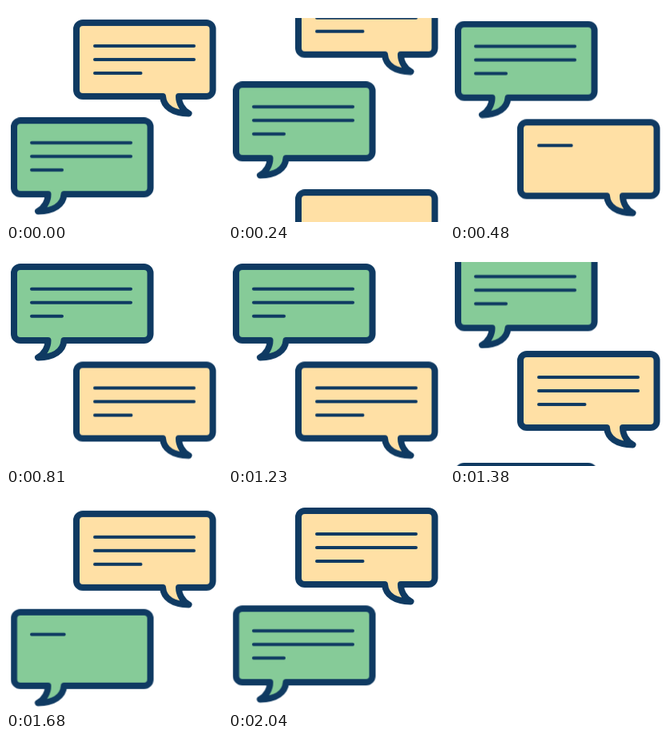
Write an HTML page without scripts that moves like this. It is 270 by 270 pixels and loops after 2.43 s.

```html
<!DOCTYPE html>
<html lang="en">
<head>
<meta charset="utf-8">
<title>Chat bubbles</title>
<style>
  html, body { margin: 0; width: 100%; height: 100%; overflow: hidden; background: #fff; }
  svg { display: block; width: 100%; height: 100%; }

  .ink { stroke: #0f3a62; stroke-linecap: round; stroke-linejoin: round; }
  .box { stroke-width: 8; }
  .line { stroke-width: 4; fill: none; }
  .yellow { fill: #ffe0a5; }
  .green { fill: #86cb98; }

  /* Each bubble rests at --a, --b and --c, with a cubic in-out slide between */
  .bubble { animation: slide 2430ms -30ms infinite; }
  .y-out { --a: 0px; --b: -142px; --c: -142px; }
  .y-in { --a: 264.5px; --b: 122.5px; --c: 0px; }
  .g-out { --a: 122.3px; --b: 0px; --c: -142px; }
  .g-in { --a: 264.3px; --b: 264.3px; --c: 122.3px; }

  @keyframes slide {
    0% {
      transform: translateY(var(--a));
      animation-timing-function: cubic-bezier(.3333, 0, .6667, 0);
    }
    12.346% {
      transform: translateY(calc((var(--a) + var(--b)) / 2));
      animation-timing-function: cubic-bezier(.3333, 1, .6667, 1);
    }
    24.691% { transform: translateY(var(--b)); }
    50.617% {
      transform: translateY(var(--b));
      animation-timing-function: cubic-bezier(.3333, 0, .6667, 0);
    }
    62.963% {
      transform: translateY(calc((var(--b) + var(--c)) / 2));
      animation-timing-function: cubic-bezier(.3333, 1, .6667, 1);
    }
    75.309%, 100% { transform: translateY(var(--c)); }
  }

  /* --t is the moment a line starts to be written */
  .write {
    stroke-dasharray: 1 2;
    animation: write 2430ms linear calc(var(--t) - 2430ms) infinite;
  }
  @keyframes write {
    0% { stroke-dashoffset: 1; opacity: 1; }
    5.514% { stroke-dashoffset: 0; }
    82% { stroke-dashoffset: 0; opacity: 1; }
    82.01%, 100% { stroke-dashoffset: 0; opacity: 0; }
  }
</style>
</head>
<body>
<svg viewBox="0 0 270 270">
  <defs>
    <clipPath id="view"><rect x="6" y="15" width="256.5" height="255"/></clipPath>
    <path id="box" class="ink box" d="M96 21H250.500a8 8 0 0 1 8 8V105a8 8 0 0 1-8 8H216C216 122 221 130 228.500 134.500C208 134 197 126 196 113H96a8 8 0 0 1-8-8V29a8 8 0 0 1 8-8Z"/>
    <path id="y1" class="ink line" pathLength="1" d="M111 50H235"/>
    <path id="y2" class="ink line" pathLength="1" d="M111 67H235"/>
    <path id="y3" class="ink line" pathLength="1" d="M111 84H168.500"/>
    <path id="g1" class="ink line" pathLength="1" d="M32 48.700H156"/>
    <path id="g2" class="ink line" pathLength="1" d="M32 65.700H156"/>
    <path id="g3" class="ink line" pathLength="1" d="M32 82.700H70"/>
    <g id="y-box" class="yellow"><use href="#box"/></g>
    <g id="g-box" class="green" transform="translate(268.500) scale(-1 1)"><use href="#box"/></g>
  </defs>

  <g clip-path="url(#view)">
    <g class="bubble y-out">
      <use href="#y-box"/>
      <use href="#y1"/><use href="#y2"/><use href="#y3"/>
    </g>
    <g class="bubble g-out">
      <use href="#g-box"/>
      <use href="#g1"/><use href="#g2"/><use href="#g3"/>
    </g>
    <g class="bubble y-in">
      <use href="#y-box"/>
      <use href="#y1" class="write" style="--t: 437ms"/>
      <use href="#y2" class="write" style="--t: 571ms"/>
      <use href="#y3" class="write" style="--t: 705ms"/>
    </g>
    <g class="bubble g-in">
      <use href="#g-box"/>
      <use href="#g1" class="write" style="--t: 1637ms"/>
      <use href="#g2" class="write" style="--t: 1771ms"/>
      <use href="#g3" class="write" style="--t: 1905ms"/>
    </g>
  </g>
</svg>
</body>
</html>
```
